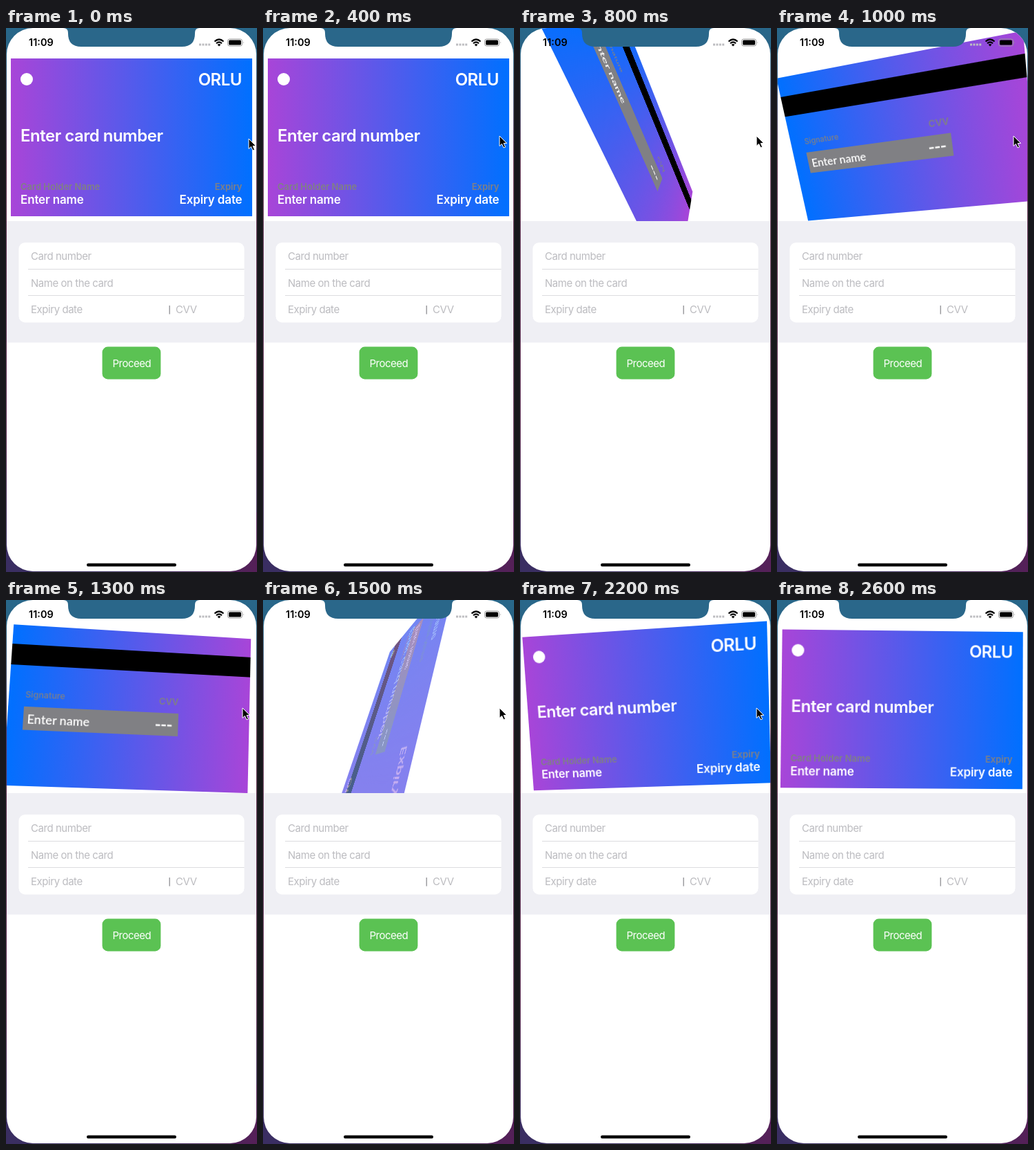
An HTML page that plays this animation: 364 px wide and 786 px high, repeating every 2700 ms.

```html
<!DOCTYPE html>
<html lang="en">
<head>
<meta charset="utf-8">
<title>Card flip</title>
<style>
  html, body { margin: 0; width: 100%; height: 100%; overflow: hidden; }
  body { background: linear-gradient(#28678a 0, #2b6384 5%, #5b2b49 25%, #5a2a50 75%, #3a2e62 96%); }
  body::after { content: ""; position: absolute; left: 182px; top: 700px; width: 182px; height: 86px;
    background: linear-gradient(90deg, transparent, #552058); z-index: -1; }
  .phone { position: absolute; left: 1px; top: 0; width: 362px; height: 785px; border-radius: 38px; background: #fff; overflow: hidden; }
  .window { position: absolute; left: 0; top: 0; width: 362px; height: 279px; overflow: hidden; }
  #card { position: absolute; left: 6px; top: 44px; width: 350px; height: 228px; }
  #screen { position: absolute; left: 0; top: 0; }
  svg { font-family: Inter, "Open Sans", sans-serif; display: block; }
  .bold { font-weight: 600; fill: #fff; }
  .title { font-size: 24px; letter-spacing: -.5px; }
  .value { font-size: 17px; letter-spacing: -.15px; }
  .caption { font-size: 13px; font-weight: 600; fill: #808084; }
  .hand { font: 600 17.5px Lato, sans-serif; fill: #fff; }
  .field { font-size: 15px; letter-spacing: -.45px; fill: #bcbcc0; }
  .end { text-anchor: end; }
</style>
</head>
<body>
<div class="phone">
  <div class="window">
    <svg id="card" viewBox="0 0 350 228">
      <defs>
        <linearGradient id="frontFill"><stop stop-color="#a845d8"/><stop offset="1" stop-color="#0070ff"/></linearGradient>
        <linearGradient id="backFill"><stop stop-color="#0070ff"/><stop offset="1" stop-color="#a845d8"/></linearGradient>
      </defs>
      <g id="front">
        <rect width="350" height="228" fill="url(#frontFill)"/>
        <circle cx="23" cy="30" r="9" fill="#fff"/>
        <text class="bold title end" x="335" y="38.5">ORLU</text>
        <text class="bold title" x="14" y="119.5">Enter card number</text>
        <text class="caption" x="14" y="190">Card Holder Name</text>
        <text class="bold value" x="14" y="210">Enter name</text>
        <text class="caption end" x="335.5" y="190">Expiry</text>
        <text class="bold value end" x="335.5" y="210">Expiry date</text>
      </g>
      <g id="back">
        <rect width="350" height="228" fill="url(#backFill)"/>
        <rect y="28" width="350" height="30"/>
        <text class="caption" x="23" y="104.5" style="font-size:12.2px;font-weight:500">Signature</text>
        <text class="caption end" x="243.5" y="105.5">CVV</text>
        <rect x="22" y="117" width="222" height="33" fill="#808084"/>
        <text class="hand" x="27.5" y="141.5">Enter name</text>
        <path d="M211 135h6.5m2 0h6.5m2 0h6.5" stroke="#fff" stroke-width="2.4"/>
      </g>
    </svg>
  </div>
</div>
<svg id="screen" width="364" height="786" viewBox="0 0 364 786">
  <rect x="1" y="279" width="362" height="175.5" fill="#efeff4"/>
  <rect x="18.5" y="310" width="327" height="115.5" rx="9" fill="#fff"/>
  <path d="M32 348.5H345.5M32 386.5H345.5" stroke="#dcdcdf"/>
  <g class="field">
    <text x="36" y="335">Card number</text>
    <text x="36" y="373.5">Name on the card</text>
    <text x="36" y="412">Expiry date</text>
    <text x="246" y="412">CVV</text>
  </g>
  <path d="M237.2 401V413.5" stroke="#85858a" stroke-width="1.2"/>
  <rect x="139.6" y="460.6" width="84.8" height="46.8" rx="8" fill="#5bc253"/>
  <text x="154.5" y="490" font-size="15" letter-spacing="-.5" fill="#fff">Proceed</text>
  <rect x="117" y="773.5" width="130" height="4.5" rx="2.25"/>

  <path d="M83 0Q90 0 90 7V8Q90 27 109 27H255Q274 27 274 8V7Q274 0 281 0Z" fill="#2a678a"/>
  <text x="33" y="26" font-size="14.5" font-weight="600">11:09</text>
  <path d="M280 24h16.5" stroke="#bdbdc1" stroke-width="3" stroke-dasharray="3 1.4"/>
  <path d="M302.5 19.5Q309 13.5 315.5 19.5M305 22.3Q309 18.6 313 22.3" fill="none" stroke="#000" stroke-width="2.2"/>
  <path d="M306.6 24Q309 22 311.4 24L309 26.5Z"/>
  <rect x="321.5" y="16" width="21" height="10" rx="2.8" fill="none" stroke="#999"/>
  <rect x="323" y="17.5" width="18" height="7" rx="1.5"/>
  <path d="M344 19.5q1.6 1.5 0 3z" fill="#999"/>
  <path id="cursor" d="M0 0V14.5L3.4 11.4L6 17L8.5 16L6 10.5H10.5Z" stroke="#fff"/>
</svg>
<script>
const LOOP = 2700, STEP = 100;
const FLIP_AT = 499, RETURN_AT = 1389, FADE = 200, CURSOR_GONE = 2600;
const [card, front, back, cursor] = ["card", "front", "back", "cursor"].map(id => document.getElementById(id));
const clamp = v => Math.min(1, Math.max(0, v));

// Bouncy spring from 0 to 1: mass 1, stiffness 150, damping 10
function spring(ms) {
  if (ms <= 0) return 0;
  const s = ms / 1000, decay = 10 / 2, freq = Math.sqrt(150 - decay * decay);
  return 1 - Math.exp(-decay * s) * (Math.cos(freq * s) + decay / freq * Math.sin(freq * s));
}

function draw(t) {
  const turn = spring(t - FLIP_AT) - spring(t - RETURN_AT);
  const fade = clamp((t - FLIP_AT) / FADE) - clamp((t - RETURN_AT) / FADE);
  card.style.transform = `perspective(350px) rotate3d(1, 1, 1, ${360 * turn}deg)`;
  back.style.opacity = fade;
  front.style.opacity = 1 - fade;
  const move = clamp(t / 200);
  cursor.setAttribute("transform", `translate(${352 - 9 * move} ${160 - 4 * move})`);
  cursor.style.opacity = t < CURSOR_GONE ? 1 : 0;
}

const start = performance.now();
function tick() {
  const t = (performance.now() - start) % LOOP;
  draw(Math.floor(t / STEP) * STEP);
  requestAnimationFrame(tick);
}
tick();
</script>
</body>
</html>
```
